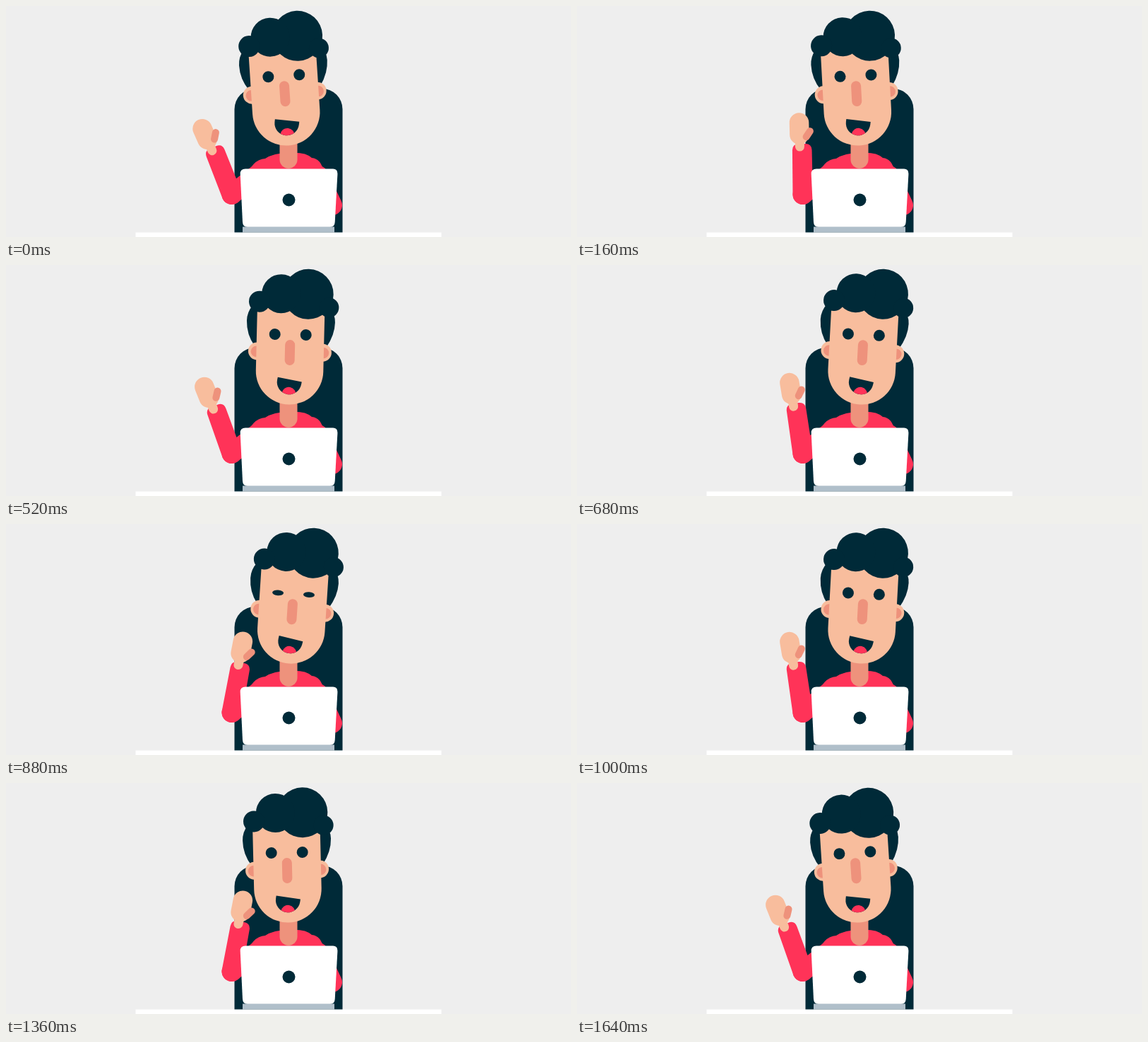
Animation, 800 px wide and 327 px high, one loop 1680 ms. Source, as an HTML page:

```html
<!DOCTYPE html>
<html lang="en">
<head>
<meta charset="utf-8">
<title>Waving at the desk</title>
<style>
  html, body { margin: 0; width: 100%; height: 100%; overflow: hidden; background: #eee; }
  svg { display: block; width: 100vw; height: 100vh; }
  .dark { fill: #002a38; }
  .skin { fill: #f8bd9d; }
  .shade { fill: #ee927c; }
  .red { fill: #ff3358; }
  .limb { fill: none; stroke-linecap: round; }
</style>
</head>
<body>
<svg viewBox="0 0 800 327">
  <defs>
    <path id="lips" d="M-17.3 0H17.3V4A17.3 17.3 0 0 1 -17.3 4Z"/>
    <clipPath id="inMouth"><use href="#lips"/></clipPath>
  </defs>

  <path class="dark" d="M323.5 321V146A29 29 0 0 1 352.5 117H447.500A29 29 0 0 1 476.500 146V321Z"/>

  <!-- body -->
  <path class="red" d="M340 245Q348 217 367 216Q379 208 400 208Q424 206 433 215Q446 216 450 235V250Z"/>
  <path class="limb" stroke="#ff3358" stroke-width="28" d="M319.5 267L362 234M442 240L462 282"/>
  <path class="limb" stroke="#ee927c" stroke-width="25" d="M400 180V217.5"/>

  <g id="head">
    <path class="dark" d="M346 58Q338 68 338 80Q338 100 350 116H451Q463 98 463 80Q463 68 454 58Z"/>
    <circle class="skin" cx="353.5" cy="123" r="12.5"/>
    <circle class="skin" cx="446.5" cy="123" r="12.5"/>
    <circle class="shade" cx="352.5" cy="123.5" r="7.8"/>
    <circle class="shade" cx="447.5" cy="123.5" r="7.8"/>
    <path class="skin" d="M352.5 58H448V150A47.75 47.5 0 0 1 352.5 150Z"/>
    <ellipse class="dark eye" cx="378.2" cy="98.5" rx="8" ry="8"/>
    <ellipse class="dark eye" cx="422.2" cy="98.5" rx="8" ry="8"/>
    <rect class="shade" x="393" y="106" width="14" height="36" rx="7"/>
    <g transform="translate(400.8 162) rotate(9.8)">
      <use class="dark" href="#lips"/>
      <g clip-path="url(#inMouth)"><circle class="red" cx="2.600" cy="20.700" r="10"/></g>
    </g>
  </g>

  <g id="hair" class="dark">
    <circle cx="424" cy="41.5" r="35.5"/>
    <circle cx="385.5" cy="41.5" r="27.5"/>
    <circle cx="355" cy="53" r="15"/>
    <circle cx="453.5" cy="60" r="14"/>
  </g>

  <!-- forearm, elbow at the local zero point -->
  <g id="arm">
    <path class="red" d="M-14 0L-13.3 -63Q-13 -72 -4 -72H5Q14 -72 14.3 -63L14.5 0A14.25 14 0 0 1 -14 0Z"/>
    <g id="hand">
      <path class="limb" stroke="#f8bd9d" stroke-width="13" d="M-3 -84L-2.7 -68"/>
      <path class="limb" stroke="#f8bd9d" stroke-width="27.5" d="M-4 -102L-3.4 -85"/>
      <path class="limb" stroke="#ee927c" stroke-width="10" d="M11.5 -90L6.3 -82"/>
    </g>
  </g>

  <!-- laptop and desk -->
  <path fill="#fff" d="M339 230.5H463Q469.700 230.5 469.4 238L465.700 306Q465.300 313 459 313H342Q335.400 313 335 306L331.700 238Q331.500 230.500 339 230.500Z"/>
  <rect fill="#b0bfca" x="335" y="312.500" width="130" height="8"/>
  <circle class="dark" cx="400.500" cy="274.500" r="9"/>
  <rect fill="#fff" x="183.500" y="320.500" width="433" height="7"/>
</svg>
<script>
  const LOOP = 1680, STEP = 40;
  const byId = id => document.getElementById(id);
  const head = byId('head'), hair = byId('hair'), arm = byId('arm'), hand = byId('hand');
  const eyes = document.querySelectorAll('.eye');
  const wave = (t, period) => -Math.cos(2 * Math.PI * t / period);
  const pose = (el, value) => el.setAttribute('transform', value);

  function draw(t) {
    const sway = wave(t, LOOP);
    const swing = wave(t, LOOP / 3);
    const open = Math.min(1, Math.max(0.1, Math.abs(t - LOOP / 2) / 82));
    pose(head, `rotate(${3.75 * sway} 400 204)`);
    // the hair turns less than the face, about a lower point
    pose(hair, `rotate(${2.7 * sway} 436 284)`);
    pose(arm, `translate(319.5 267) rotate(${-4.9 + 16.8 * swing})`);
    pose(hand, `rotate(${1.5 + 1.5 * swing} -2.7 -68)`);
    eyes.forEach(eye => eye.setAttribute('ry', 8 * open));
  }

  const start = performance.now();
  function tick() {
    const t = (performance.now() - start) % LOOP;
    draw(Math.floor(t / STEP) * STEP);
    requestAnimationFrame(tick);
  }
  draw(0);
  requestAnimationFrame(tick);
</script>
</body>
</html>
```
